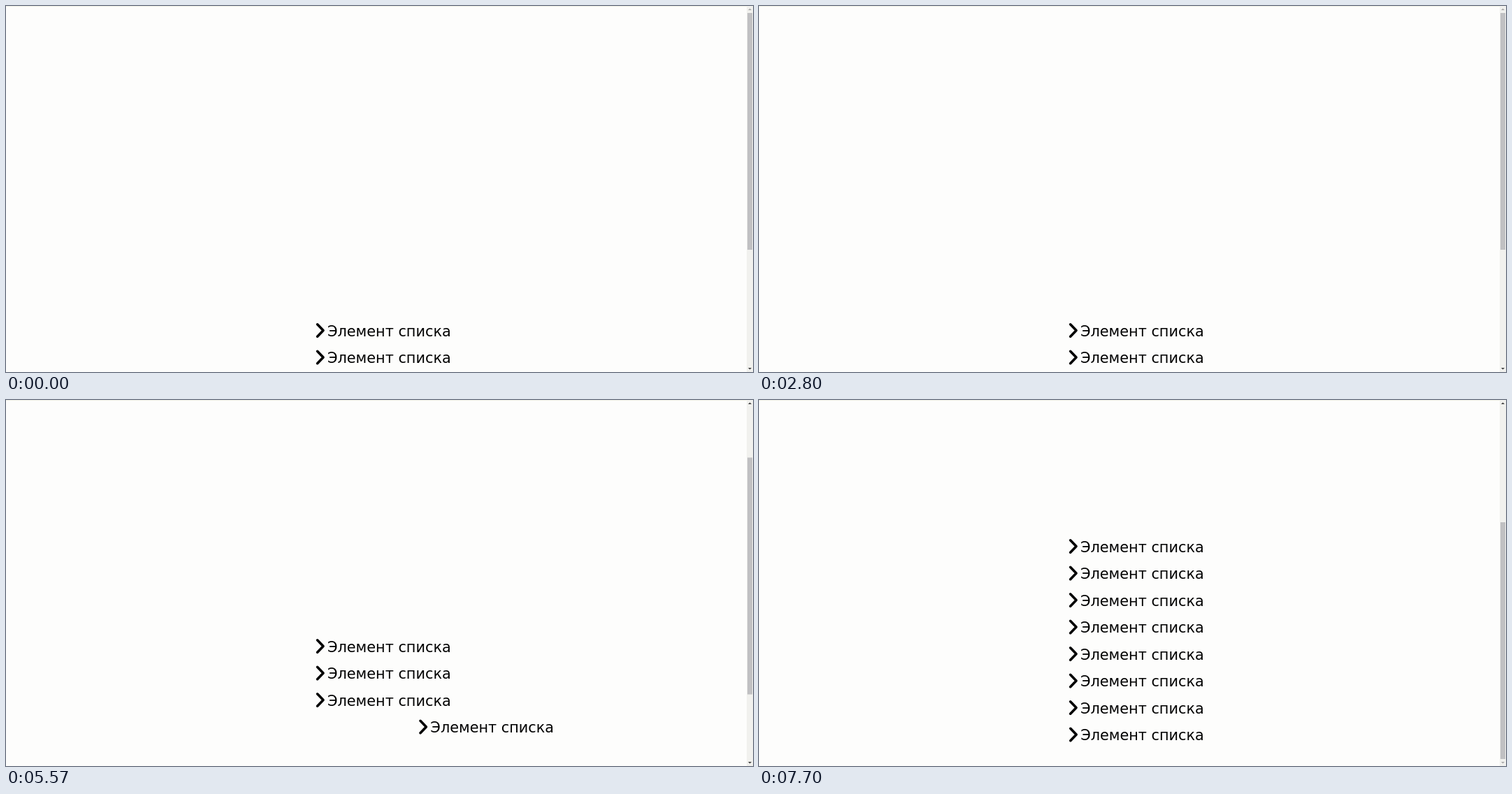
An HTML page with a canvas for the animation above (8 s loop, 1069 by 524 pixels).

```html
<!DOCTYPE html>
<html lang="ru">
<head>
<meta charset="utf-8">
<title>Список</title>
<style>
html, body { margin: 0; width: 100%; height: 100%; overflow: hidden; background: #fdfdfc; }
canvas { display: block; }
</style>
</head>
<body>
<canvas id="stage" width="1069" height="524"></canvas>
<script>
const W = 1069, H = 524, LOOP = 8000;
const LABEL = 'Элемент списка';
const FONT = '20.8px "DejaVu Sans", Verdana, sans-serif';
const ROW = 38.5, LEFT = 443, FIRST = 464.5;
const START_X = -1680, PEAK_X = 189, RISE = 600, SETTLE = 400;
const RELOAD = 1600;

// entry start of each list item, ms
const ENTRIES = [1545, 1545, 3400, 4840, 6470, 6574, 6610, 6708];
// start, duration, distance
const SCROLLS = [[3250, 290, 56], [4680, 295, 56], [6385, 400, 143]];
const MAX_SCROLL = 255;

const ctx = document.getElementById('stage').getContext('2d');

const clamp = v => Math.min(1, Math.max(0, v));
const mix = (a, b, k) => a + (b - a) * k;

// cubic-bezier(.42, 0, .58, 1)
function easeInOut(x) {
  let lo = 0, hi = 1;
  for (let i = 0; i < 20; i++) {
    const s = (lo + hi) / 2, r = 1 - s;
    if (1.26 * r * r * s + 1.74 * r * s * s + s * s * s < x) lo = s;
    else hi = s;
  }
  return lo * lo * (3 - 2 * lo);
}

const progress = (t, start, length) => {
  const k = clamp((t - start) / length);
  return k === 0 || k === 1 ? k : easeInOut(k);
};

function itemOffset(i, t) {
  if (t < RELOAD) return i < 2 ? 0 : START_X;
  const start = ENTRIES[i], peak = start + RISE;
  return t < peak
    ? mix(START_X, PEAK_X, progress(t, start, RISE))
    : mix(PEAK_X, 0, progress(t, peak, SETTLE));
}

const scrollTop = t =>
  SCROLLS.reduce((sum, [start, length, px]) => sum + px * progress(t, start, length), 0);

function drawItem(x, y) {
  ctx.beginPath();
  ctx.moveTo(x + 2.6, y - 8.7);
  ctx.lineTo(x + 11, y);
  ctx.lineTo(x + 2.6, y + 8.7);
  ctx.stroke();
  ctx.fillText(LABEL, x + 17, y + 8);
}

function drawArrow(y, dir, active) {
  ctx.fillStyle = active ? '#404040' : '#a8a8a8';
  ctx.beginPath();
  ctx.moveTo(1062, y);
  ctx.lineTo(1067, y);
  ctx.lineTo(1064.5, y + dir * 2.6);
  ctx.fill();
}

function drawScrollbar(top) {
  ctx.fillStyle = '#f1f1ee';
  ctx.fillRect(1060, 0, 9, H);
  ctx.fillStyle = '#c0c0c2';
  ctx.fillRect(1061, 10 + top / MAX_SCROLL * 165, 7, 339);
  drawArrow(6, -1, top > 0);
  drawArrow(518, 1, top < MAX_SCROLL);
}

function draw(t) {
  const top = scrollTop(t);
  ctx.fillStyle = '#fdfdfc';
  ctx.fillRect(0, 0, W, H);
  ctx.fillStyle = '#f1f1e6';
  ctx.fillRect(0, 0, W, 1);

  ctx.font = FONT;
  ctx.fillStyle = ctx.strokeStyle = '#000';
  ctx.lineWidth = 3.6;
  ctx.lineCap = 'round';
  ctx.lineJoin = 'round';
  ENTRIES.forEach((_, i) => drawItem(LEFT + itemOffset(i, t), FIRST + i * ROW - top));

  drawScrollbar(top);
}

let origin;
function tick(now) {
  origin ??= now;
  draw((now - origin) % LOOP);
  requestAnimationFrame(tick);
}
draw(0);
requestAnimationFrame(tick);
</script>
</body>
</html>
```
